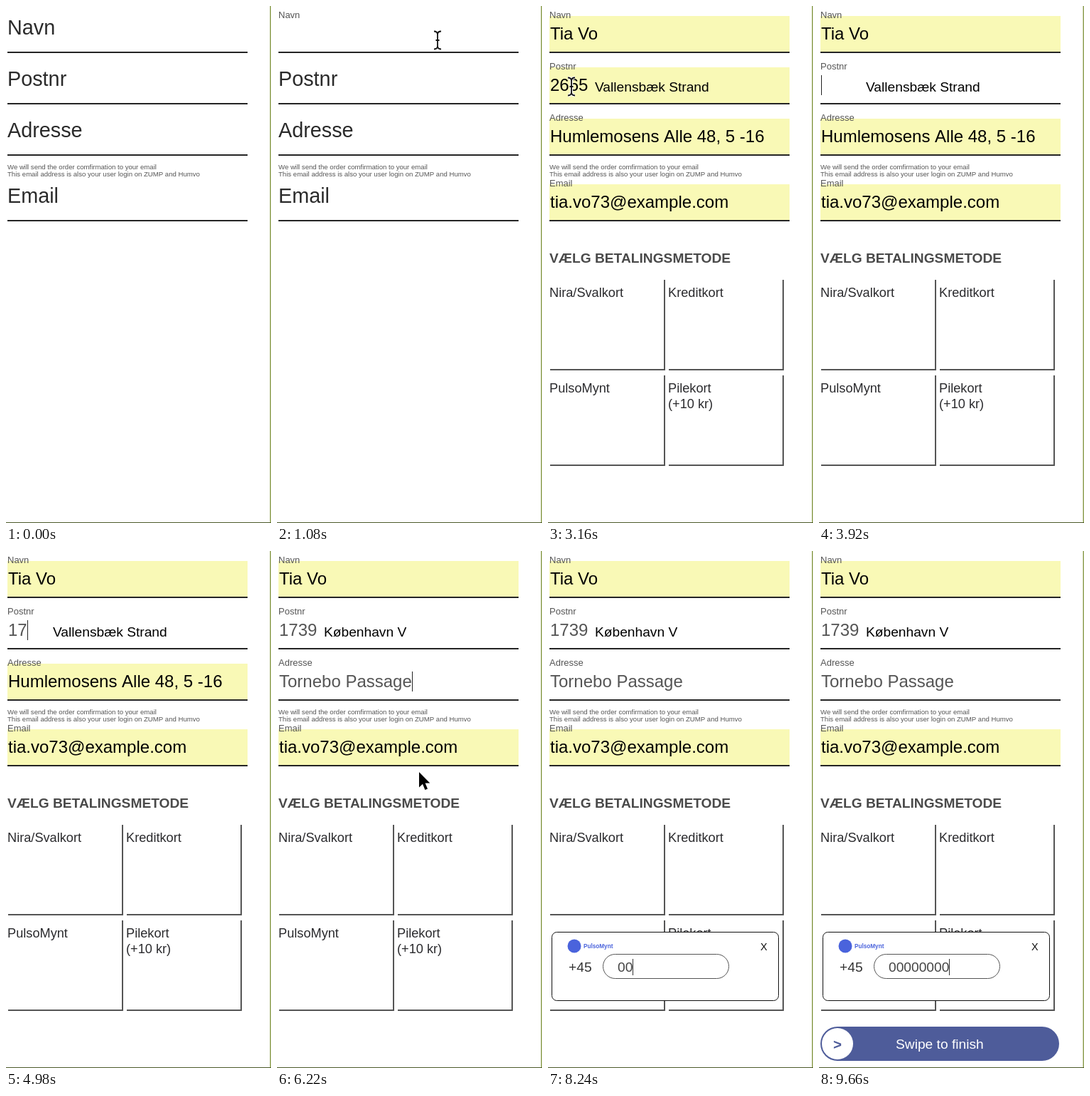
These frames come from a looping animation (373x725 px, 9.68 s). An HTML page with a canvas:

```html
<!DOCTYPE html>
<html lang="da">
<head>
<meta charset="utf-8">
<title>Checkout form</title>
<style>
  html, body { margin: 0; width: 100%; height: 100%; overflow: hidden; background: #fff; }
  canvas { display: block; width: 373px; height: 725px; }
</style>
</head>
<body>
<canvas id="stage"></canvas>
<script>
const LOOP = 9680, W = 373, H = 725;
const FILL = 2140, POPUP = 6900, DIGITS = 7900, SWIPE = 9320;
const INK = '#2b2b2e', GREY = '#555', BLUE = '#4e5c9a';

const canvas = document.getElementById('stage');
const dpr = window.devicePixelRatio || 1;
canvas.width = W * dpr;
canvas.height = H * dpr;
const c = canvas.getContext('2d');

const progress = (t, start, length) => Math.min(1, Math.max(0, (t - start) / length));
const mix = (a, b, p) => a + (b - a) * p;
const typed = (s, t, start, step) => s.slice(0, Math.max(0, Math.floor((t - start) / step) + 1));

function rect(x, y, w, h, color) {
  c.fillStyle = color;
  c.fillRect(x, y, w, h);
}

// Returns the x position just after the text.
function text(s, x, y, size, color, weight = '') {
  c.font = `${weight} ${size}px "Liberation Sans", Arial, sans-serif`;
  c.fillStyle = color;
  c.fillText(s, x, y);
  return x + c.measureText(s).width;
}

function pill(x, y, w, h, r, fill, stroke) {
  c.beginPath();
  c.roundRect(x, y, w, h, r);
  c.fillStyle = fill;
  c.fill();
  if (!stroke) return;
  c.strokeStyle = stroke;
  c.lineWidth = 1;
  c.stroke();
}

function disc(x, y, r, color) {
  c.beginPath();
  c.arc(x, y, r, 0, 2 * Math.PI);
  c.fillStyle = color;
  c.fill();
}

// y is the bottom rule of the field.
function field(t, y, label, labelStart, value, color, filled, caret) {
  if (filled) rect(2, y - 51, 338, 51, '#f9f9b6');
  rect(2, y - 1, 338, 2, '#252525');
  const end = text(value, 3, y - 18, 24, color);
  if (caret) rect(Math.round(end), y - 40, 1, 28, '#222');
  const p = progress(t, labelStart, 240);
  const g = Math.round(mix(43, 85, p));
  text(label, 2, y - mix(25, 48, p ** 0.75), mix(28.8, 13, p), `rgb(${g},${g},${g})`);
}

function form(t) {
  const filled = t >= FILL;
  const typing = t >= 1120 && !filled;
  field(t, 65, 'Navn', 500, filled ? 'Tia Vo' : typing ? 'T' : '',
    filled ? '#000' : GREY, filled, t >= 1120 && t < 2700);

  const oldCode = t < 3900, oldStreet = t < 5240;
  const keys = [4600, 4840, 5020, 5100].filter(k => t >= k).length;
  const code = !filled ? '' : oldCode ? '2665' : '1739'.slice(0, keys);
  field(t, 137, 'Postnr', FILL, code, oldCode ? '#000' : GREY,
    filled && oldCode, t >= 3900 && oldStreet);
  if (filled) text(t < 5160 ? 'Vallensbæk Strand' : 'København V', 66, 120, 19.2, '#000');

  const street = !filled ? '' : oldStreet ? 'Humlemosens Alle 48, 5 -16'
    : typed('Tornebo Passage', t, 5300, 45);
  field(t, 209, 'Adresse', FILL, street, oldStreet ? '#000' : GREY,
    filled && oldStreet, !oldStreet && t < POPUP);

  text('We will send the order comfirmation to your email', 2, 229, 9.6, GREY);
  text('This email address is also your user login on ZUMP and Humvo', 2, 239, 9.6, GREY);
  field(t, 301, 'Email', FILL, filled ? 'tia.vo73@example.com' : '', '#000', filled, false);
}

function tile(x, y) {
  rect(x + 160, y, 2, 126.5, GREY);
  rect(x, y + 125, 162, 2, GREY);
}

function payment(t, popup) {
  const shown = progress(t, FILL, 100);
  c.globalAlpha = shown;
  text('VÆLG BETALINGSMETODE', 2, 360, 19.2, '#4a4a4a', 'bold');
  for (const y of [384, 518]) {
    tile(3, y);
    tile(170, y);
  }
  const label = (s, x, y) => text(s, x, y, 18.2, INK);
  label('Nira/Svalkort', 2, 408);
  label('Kreditkort', 169, 408);
  label('Pilekort', 169, 542);
  label('(+10 kr)', 169, 564);
  c.globalAlpha = shown * (1 - popup);
  label('PulsoMynt', 2, 542);
  c.globalAlpha = 1;
}

function phonePopup(t, scale) {
  if (!scale) return;
  c.save();
  c.translate(165, 582.5);
  c.scale(scale, scale);
  c.translate(-165, -582.5);
  pill(5.5, 534.5, 319, 96, 7, '#fff', '#111');
  disc(37, 554, 9.5, '#4a63dc');
  text('PulsoMynt', 50, 557, 8.2, '#4a63dc', 'bold');
  text('X', 299, 560, 14.4, '#111');
  text('+45', 29, 590, 19.2, '#333');
  pill(77.5, 565.5, 177, 34, 17, '#fff', '#555');
  const end = text(typed('00000000', t, DIGITS, 200), 98, 590, 19.2, '#444');
  rect(Math.round(end), 572, 1, 23, t < DIGITS ? '#b33c3c' : '#333');
  c.restore();
}

function swipeButton(t) {
  c.globalAlpha = progress(t, SWIPE, 300);
  pill(2, 667, 336, 48, 24, BLUE);
  disc(26, 691, 22, '#fff');
  text('>', 20, 699, 20.5, BLUE, 'bold');
  text('Swipe to finish', 108, 698, 19.2, '#fff');
  c.globalAlpha = 1;
}

// Each stretch of pointer motion: time and place.
const paths = [
  [[20, 372, 244], [180, 24, 29], [500, 24, 29], [700, 320, 50], [860, 226, 48], [1120, 226, 48]],
  [[1440, 226, 60], [1900, 130, 104], [2100, 108, 88], [2400, 108, 88], [3040, 33, 113], [3900, 33, 113]],
  [[6000, 33, 113], [6220, 200, 310], [6600, 67, 554], [7060, 67, 554], [7500, 150, 584], [DIGITS, 150, 584]]
];

function pointerAt(t) {
  for (const path of paths) {
    const i = path.findIndex(k => k[0] > t);
    if (i < 1) continue;
    const [a, b] = [path[i - 1], path[i]];
    const p = progress(t, a[0], b[0] - a[0]);
    const ease = p * p * (3 - 2 * p);
    return [mix(a[1], b[1], ease), mix(a[2], b[2], ease)];
  }
}

const arrow = new Path2D('M0 0V21.5L5 16.8L8.4 25L12 23.4L8.6 15.4H15.3Z');
const beam = new Path2D('M-5-12.5Q0-12.5 0-8Q0-12.5 5-12.5M0-9V9M-5 12.5Q0 12.5 0 8Q0 12.5 5 12.5M-2.5 0H2.5');

function pointer(t) {
  const at = pointerAt(t);
  if (!at) return;
  const isArrow = t >= 1440 && t < 2800 || t >= 6120 && t < 7350;
  c.save();
  c.translate(...at);
  c.lineJoin = 'round';
  c.strokeStyle = '#fff';
  c.lineWidth = isArrow ? 2.5 : 4;
  c.stroke(isArrow ? arrow : beam);
  if (isArrow) {
    c.fillStyle = '#000';
    c.fill(arrow);
  } else {
    c.strokeStyle = '#111';
    c.lineWidth = 1.8;
    c.stroke(beam);
  }
  c.restore();
}

function draw() {
  const t = performance.now() % LOOP;
  const popup = 1 - (1 - progress(t, POPUP, 248)) ** 3;
  c.setTransform(dpr, 0, 0, dpr, 0, 0);
  rect(0, 0, W, H, '#fff');
  form(t);
  payment(t, popup);
  phonePopup(t, popup);
  swipeButton(t);
  rect(371.5, 0, 1.5, H, '#8d9f52');
  rect(0, 724, W, 1, '#4c5a2a');
  pointer(t);
  requestAnimationFrame(draw);
}
draw();
</script>
</body>
</html>
```
